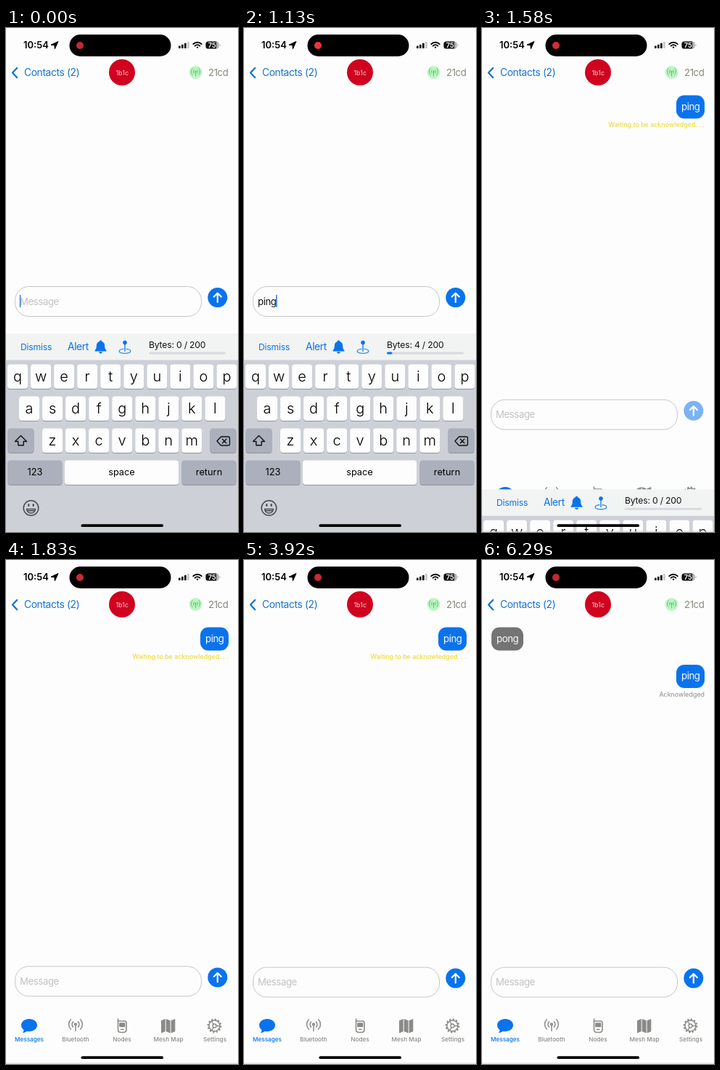
An HTML page for the animation above (6.33 s loop, 320 px wide and 693 px high).

```html
<!DOCTYPE html>
<html lang="en">
<head>
<meta charset="utf-8">
<title>Chat</title>
<style>
  html, body { margin: 0; width: 100%; height: 100%; overflow: hidden; background: #fdfdfd; }
  svg { display: block; width: 100%; height: 100%; font-family: Inter, "Open Sans", sans-serif; }
  text { white-space: pre; }
  .blue { fill: #0a73ec; }
  .body { font-size: 13.8px; letter-spacing: -.37px; }
  .msg { font-size: 13.2px; letter-spacing: -.4px; }
  .small { font-size: 12.2px; letter-spacing: -.2px; }
  .note { font-size: 8.9px; text-anchor: end; }
  .tab { font-size: 8.2px; font-weight: 500; text-anchor: middle; }
  .key { fill: #fdfdfe; }
  .mod { fill: #abb0bc; }
  .shade { fill: #90949c; }
  .letter { font-size: 20px; font-weight: 300; text-anchor: middle; }
  .word { font-size: 12.8px; text-anchor: middle; }
  .line { fill: none; stroke-linecap: round; stroke-linejoin: round; }
  .record { animation: pulse 2.11s ease-in-out infinite; }
  @keyframes pulse { 0%, 100% { fill: #c22a30; } 40% { fill: #ee3838; } }
</style>
</head>
<body>
<svg viewBox="0 0 320 693" preserveAspectRatio="none">
  <defs>
    <g id="antenna" class="line" stroke-width="1.5">
      <path d="M0 0V9M-3.4-3.6a5 5 0 0 0 0 7.2M3.4-3.6a5 5 0 0 1 0 7.2M-6.6-6.8a9.6 9.6 0 0 0 0 13.6M6.6-6.8a9.6 9.6 0 0 1 0 13.6"/>
      <circle r="1.4"/>
    </g>
  </defs>
  <rect width="320" height="693" fill="#fdfdfd"/>

  <!-- status bar -->
  <text x="24" y="28" font-size="13" font-weight="600">10:54</text>
  <path d="M72 18.5 62 23.2l4.9.5.5 5Z" stroke="#000" stroke-linejoin="round"/>
  <rect x="87.5" y="9" width="140" height="30" rx="15"/>
  <circle class="record" cx="102" cy="24" r="5"/>
  <g>
    <rect x="238" y="24.5" width="2.7" height="3.5" rx=".7"/>
    <rect x="242" y="22.7" width="2.7" height="5.3" rx=".7"/>
    <rect x="246" y="20.8" width="2.7" height="7.2" rx=".7"/>
    <rect x="250" y="18.8" width="2.7" height="9.2" rx=".7" fill="#c8c8ca"/>
  </g>
  <g class="line" stroke="#000" stroke-width="1.9" stroke-linecap="butt">
    <path d="M258.2 22.1a8.2 8.2 0 0 1 11.6 0M260.6 24.6a4.9 4.9 0 0 1 6.8 0"/>
    <path d="M264 28.2l-1.5-1.9a2.2 2.2 0 0 1 3 0Z" fill="#000" stroke="none"/>
  </g>
  <path d="M279 18.5h11v10h-11a3.6 3.6 0 0 1-3.6-3.6v-2.8a3.6 3.6 0 0 1 3.6-3.6Z" fill="#111"/>
  <path d="M290 18.5a3.6 3.6 0 0 1 3.6 3.6v2.8a3.6 3.6 0 0 1-3.6 3.6Z" fill="#b0b0b3"/>
  <path d="M294.5 22v3q1.2-.4 1.2-1.5t-1.2-1.5Z" fill="#b0b0b3"/>
  <text x="284.3" y="27" font-size="9.3" font-weight="600" text-anchor="middle" fill="#fff">75</text>

  <!-- navigation bar -->
  <path class="line" d="M15.2 55 9 61.6l6.2 6.6" stroke="#0a70dc" stroke-width="2.2"/>
  <text class="body" x="25" y="66" fill="#1673d2">Contacts (2)</text>
  <circle cx="160" cy="61" r="18" fill="#d0021f"/>
  <text x="160.3" y="64.5" font-size="9" text-anchor="middle" fill="#f6cfd2">1b1c</text>
  <circle cx="261.5" cy="61" r="9" fill="#bdf6c4"/>
  <use href="#antenna" transform="translate(261.5 60) scale(.66)" stroke="#5cc76c"/>
  <text x="279" y="66" font-size="13.2" letter-spacing="-.4" fill="#88887e">21cd</text>

  <!-- conversation -->
  <g id="pong">
    <rect x="13" y="92.5" width="44" height="32" rx="11" fill="#747474"/>
    <text class="msg" x="20" y="112.5" fill="#fdfdfd">pong</text>
  </g>
  <g id="ping">
    <rect class="blue" x="268" y="92.5" width="39" height="32" rx="11"/>
    <text class="msg" x="275" y="112.5" fill="#fdfdfd">ping</text>
    <text id="waiting" class="note" x="307" y="136" font-weight="500" fill="#efd93c">Waiting to be acknowledged. . .</text>
    <text id="acked" class="note" x="307" y="136" fill="#8c8c8c">Acknowledged</text>
  </g>

  <!-- tab bar -->
  <g id="tabs" fill="#8a8a88" stroke="#8a8a88" stroke-width="0">
    <path class="blue" d="M32 631c6.2 0 11 3.7 11 8.6s-4.8 8.7-11 8.7c-1.2 0-2.3-.1-3.4-.4-1.5 1.3-3.6 2.2-5.7 2.1 1-1 1.6-2.4 1.6-3.7-2.2-1.6-3.5-3.9-3.5-6.7 0-4.9 4.8-8.6 11-8.6Z"/>
    <use href="#antenna" transform="translate(96 638.5)"/>
    <g class="line" stroke-width="1.6">
      <path d="M154.500 631v14.500q0 4 4 4h3.500q4 0 4-4v-9q0-2.500-2.500-2.500h-9"/>
      <rect x="157" y="637" width="6.5" height="4.5" fill="#8a8a88"/>
      <path d="M158.500 645.500h3.500"/>
    </g>
    <path d="M214 633.3l5.700-2.300v17.200l-5.700 2.300ZM220.700 631l5.900 2.300v17.200l-5.900-2.300ZM227.600 633.300l5.700-2.300v17.200l-5.700 2.300Z"/>
    <g class="line" transform="translate(287.5 640.5)">
      <circle r="7.5" stroke-width="1.5"/>
      <circle r="8.9" stroke-width="2" stroke-dasharray="2.33 2.33" stroke-linecap="butt"/>
      <circle r="2.5" stroke-width="1.3"/>
      <path d="M2.5 0h5M-1.25-2.16l-2.5-4.33M-1.25 2.16l-2.5 4.33" stroke-width="1.3"/>
    </g>
  </g>

  <!-- message field -->
  <g id="field">
    <rect x="12.5" y="355.5" width="257" height="41" rx="19" fill="#fdfdfd" stroke="#c6c6c8"/>
    <text id="draft" class="msg" x="19" y="380.5"></text>
    <rect id="caret" y="367" width="1.6" height="17" fill="#3f7fe0"/>
    <g id="send">
      <circle class="blue" cx="291.8" cy="370.6" r="13.5"/>
      <path class="line" d="M291.8 377v-12.500m-5 5 5-5 5 5" stroke="#fdfdfd" stroke-width="2.2"/>
    </g>
  </g>

  <!-- keyboard -->
  <g id="board">
    <rect y="420" width="320" height="37" fill="#f2f3f3"/>
    <rect y="456.5" width="320" height="240" fill="#cdd1d7"/>
    <text class="small blue" x="20" y="442.5">Dismiss</text>
    <text class="body blue" x="85" y="443">Alert</text>
    <path class="blue" d="M130.500 429.500c1 0 1.600.6 1.700 1.500 2.800.8 4 3.200 4 6 0 3.600.8 4.600 2 5.900.8.8.4 1.600-.6 1.600h-14.200c-1 0-1.400-.8-.6-1.600 1.200-1.300 2-2.300 2-5.900 0-2.800 1.200-5.200 4-6 .1-.9.7-1.500 1.700-1.500ZM128.100 445.300h4.800a2.400 2.400 0 0 1-4.800 0Z"/>
    <g class="line" stroke="#3a8fe0" stroke-width="1.3">
      <path d="M162 441.400c-3.400.3-5.800 1.500-5.800 2.900 0 1.800 3.400 3.100 7.800 3.100s7.800-1.300 7.800-3.100c0-1.400-2.400-2.600-5.800-2.900"/>
      <path d="M164 435v9.200" stroke-width="1.6"/>
      <circle class="blue" cx="164" cy="432.6" r="2.8" stroke="none"/>
    </g>
    <text id="count" class="small" x="197" y="439.5" fill="#111"></text>
    <rect x="197" y="445.5" width="106" height="3" rx="1.5" fill="#d9dadd"/>
    <rect id="bar" class="blue" x="197" y="445.5" height="3" rx="1.5"/>
    <g id="keys"></g>
    <path class="line" d="M20.500 560.500l8 8h-4.300v5.200h-7.400v-5.200h-4.300Z" stroke="#111" stroke-width="1.4"/>
    <path class="line" d="M296.500 562h10q2 0 2 2v8q0 2-2 2h-10l-5.500-6ZM298.500 565.300l5.400 5.400m0-5.400-5.400 5.400" stroke="#111" stroke-width="1.4"/>
    <g class="line" stroke="#484a4e" stroke-width="1.5">
      <circle cx="34.5" cy="660" r="10.3"/>
      <path d="M28.500 661.500h12q-.7 5.500-6 5.500t-6-5.500Zm.7 2.200h10.600"/>
      <path d="M31.300 655.200v1.800m6.400-1.800v1.800" stroke-width="2.2"/>
    </g>
  </g>

  <rect x="103.5" y="682.3" width="113.5" height="3.7" rx="1.85"/>
  <rect y="691.5" width="320" height="1" fill="#d8d8da"/>
</svg>
<script>
const LOOP = 6330, PRESS = 1340, SENT = 1390, ACK = 4600, REPLY = 5800;
const TYPED = [420, 640, 830, 1020];
const $ = id => document.getElementById(id);

function key(x, y, w, label, type = 'key') {
  const size = label.length > 1 ? 'word' : 'letter';
  const base = y + (size === 'word' ? 20.5 : 23);
  return `<rect class="shade" x="${x}" y="${y + 1}" width="${w}" height="33.5" rx="4"/>
    <rect class="${type}" x="${x}" y="${y}" width="${w}" height="33.5" rx="4"/>
    <text class="${size}" x="${x + w / 2}" y="${base}">${label}</text>`;
}

const row = (letters, x, y) =>
  [...letters].map((c, i) => key(x + 32.05 * i, y, 28, c)).join('');

$('keys').innerHTML =
  row('qwertyuiop', 2, 462.5) + row('asdfghjkl', 18, 506.5) + row('zxcvbnm', 50, 550.5) +
  key(2.5, 550.5, 36, '', 'mod') + key(281.5, 550.5, 36, '', 'mod') +
  key(2.5, 594.5, 75, '123', 'mod') + key(81, 594.5, 157, 'space') +
  key(242.5, 594.5, 75, 'return', 'mod');

$('tabs').innerHTML += ['Messages', 'Bluetooth', 'Nodes', 'Mesh Map', 'Settings'].map((name, i) =>
  `<text class="tab${i ? '' : ' blue'}" x="${32 + 64 * i}" y="662">${name}</text>`).join('');

// Critically damped spring from 0 to 1
function spring(ms) {
  const x = Math.max(0, ms) * .018;
  return 1 - (1 + x) * Math.exp(-x);
}

const clamp = x => Math.min(1, Math.max(0, x));
const show = (id, on) => $(id).setAttribute('display', on ? 'inline' : 'none');
const moveY = (id, y) => $(id).setAttribute('transform', `translate(0 ${y.toFixed(2)})`);

function draw(t) {
  const sent = t >= SENT, reply = t >= REPLY;
  const n = sent ? 0 : TYPED.filter(at => t >= at).length;

  $('draft').textContent = n ? 'ping'.slice(0, n) : 'Message';
  $('draft').setAttribute('fill', n ? '#111' : '#c2c2c5');
  $('caret').setAttribute('x', n ? 18.5 + $('draft').getComputedTextLength() : 18.8);
  show('caret', !sent);
  $('count').textContent = `Bytes: ${n} / 200`;
  $('bar').setAttribute('width', n ? 5.5 + n * .5 : 0);

  show('ping', sent);
  show('pong', reply);
  show('waiting', t < ACK);
  show('acked', t >= ACK);
  moveY('ping', reply ? 51.5 : 0);

  moveY('board', 273 * spring(t - 1420));
  moveY('field', 204.5 * spring(t - 1428));
  $('send').setAttribute('opacity', t < PRESS ? 1 : .28 + .72 * clamp((t - 1470) / 320));
}

function tick() {
  draw(performance.now() % LOOP);
  requestAnimationFrame(tick);
}
tick();
</script>
</body>
</html>
```
